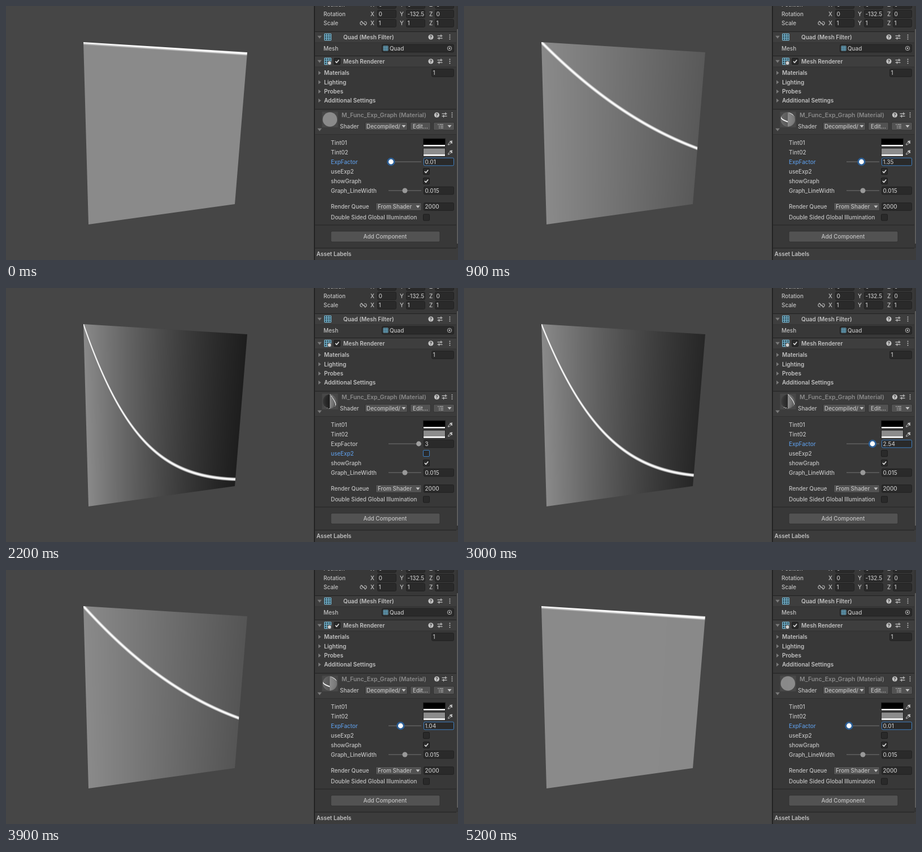
Recreate the animation shown at these times as an HTML page with a canvas. Size 800 by 450 pixels, loop 5500 ms.

```html
<!DOCTYPE html>
<html lang="en">
<head>
<meta charset="utf-8">
<title>Exponential graph material</title>
<style>
html, body { margin: 0; width: 100%; height: 100%; overflow: hidden; background: #464646; }
svg, canvas { position: absolute; left: 0; top: 0; width: 100%; height: 100%; display: block; }
text { font: 500 9.9px Inter, Roboto, sans-serif; fill: #c2c2c2; white-space: pre; }
text.bold { font-weight: 600; font-size: 10px; }
text.title { font-weight: 600; font-size: 10.4px; fill: #8b8b8b; }
text.mid { text-anchor: middle; }
.focus text { fill: #5c97dc; }
.on { stroke: #3f7fc1 !important; }
</style>
</head>
<body>
<svg id="ui" viewBox="0 0 800 450"></svg>
<canvas id="view" width="800" height="450"></canvas>
<script>
const LOOP = 5500, STEP = 100, LINE_WIDTH = 0.015;
const ui = document.getElementById('ui');
const view = document.getElementById('view').getContext('2d');

// ---------- inspector panel ----------
const rect = (x, y, w, h, fill, more = '') =>
  `<rect x="${x}" y="${y}" width="${w}" height="${h}" fill="${fill}" ${more}/>`;
const text = (x, y, s, cls = '', more = '') =>
  `<text x="${x}" y="${y + 3.6}" class="${cls}" ${more}>${s}</text>`;
const path = (d, stroke = '#c4c4c4', width = 1, fill = 'none') =>
  `<path d="${d}" stroke="${stroke}" stroke-width="${width}" fill="${fill}"/>`;
const circle = (x, y, r, fill, more = '') =>
  `<circle cx="${x}" cy="${y}" r="${r}" fill="${fill}" ${more}/>`;
const line = (y, color = '#202020') => rect(547, y, 250, 1, color);

const field = (x, y, w, s, id = '') =>
  rect(x + .5, y - 6.8, w - 1, 13.6, '#2a2a2a', `rx="2" stroke="#212121" ${id && `id="${id}Box"`}`) +
  text(x + 2.5, y, s, '', id && `id="${id}Text"`);
const button = (x, y, w, h = 14) =>
  rect(x + .5, y - h / 2, w - 1, h, '#525252', 'rx="2" stroke="#303030"');
const arrowDown = (x, y, r = 3.5, fill = '#c4c4c4') =>
  path(`M${x - r} ${y - r * .6}h${2 * r}l${-r} ${r * 1.3}z`, 'none', 0, fill);
const arrowRight = (x, y) => path(`M${x - 2} ${y - 3.5}v7l4.5 -3.5z`, 'none', 0, '#7a7a7a');
const tick = (x, y) => `M${x - 3} ${y}l2.2 2.4l4 -4.8`;
const checkbox = (x, y, on, id = '') =>
  rect(x - 5.5, y - 5.5, 11, 11, '#2a2a2a', `rx="1.5" stroke="#1c1c1c" ${id && `id="${id}Box"`}`) +
  `<g ${id && `id="${id}Tick"`}>${on ? path(tick(x, y), '#e6e6e6', 1.6) : ''}</g>`;
const grid = (x, y, s) => {
  let d = '';
  for (let i = 0; i < 4; i++) {
    const o = (i / 3 - .5) * s;
    d += `M${x + o} ${y - s / 2}v${s}M${x - s / 2} ${y + o}h${s}`;
  }
  return rect(x - s / 2, y - s / 2, s, s, '#2b4650') + path(d, '#86cdec', s / 11);
};
const headerIcons = (a, b, c, y) =>
  circle(a, y, 4.6, '#c4c4c4') +
  `<text x="${a}" y="${y + 2.9}" class="mid" style="font-size:8px;font-weight:700;fill:#3c3c3c">?</text>` +
  path(`M${b - 5} ${y - 2.2}h9M${b - 5} ${y + 2.2}h9M${b + 1.5} ${y - 4.4}v4.4M${b - 2} ${y}v4.4`, '#c4c4c4', 1.2) +
  [-3.6, 0, 3.6].map(o => circle(c, y + o, 1, '#c4c4c4')).join('');
const slider = (y, knob) =>
  rect(677, y - .8, 58, 1.6, '#5e5e5e') + knob;
const swatch = (y, color) =>
  rect(738.5, y - 7, 39, 14, color, 'stroke="#212121"') + rect(739, y + 4, 38, 2.6, '#fff') +
  path(`M782.5 ${y + 4}l.6 -2.2l4 -4l1.8 1.8l-4 4z`, '#c4c4c4', 1) +
  path(`M785.8 ${y - 2.8}l4 4M787.5 ${y - 1}l2.2 -2.2`, '#c4c4c4', 2);
const axes = (y, values) => ['X', 'Y', 'Z'].map((name, i) => {
  const x = [645, 697, 749][i];
  return text(x, y, name) + `<svg x="${[657, 708, 759][i]}" y="${y - 8}" width="34" height="16">` +
    field(0, 8, 34, values[i]) + '</svg>';
}).join('');

ui.innerHTML =
  rect(0, 0, 800, 450, '#464646') + rect(545, 0, 255, 450, '#383838') + rect(545, 0, 1.6, 450, '#1d1d1d') +
  // transform
  text(562, -2.5, 'Position') + axes(-2.5, ['0', '0', '0']) +
  text(562, 14, 'Rotation') + axes(14, ['0', '-132.5', '0']) +
  text(562, 30.5, 'Scale') + axes(30.5, ['1', '1', '1']) +
  path('M631 27.8h-1.4a2.7 2.7 0 0 0 0 5.4h1.4M634 27.8h1.4a2.7 2.7 0 0 1 0 5.4h-1.4M630 30.5h5M628.5 26.5l8 8', '#b4b4b4', 1.1) +
  // mesh filter
  rect(547, 45, 250, 20, '#3e3e3e') + line(45) + line(64.5, '#303030') +
  arrowDown(555, 55, 3.8, '#7a7a7a') + grid(569.5, 55, 11.5) + text(597, 55, 'Quad (Mesh Filter)', 'bold') +
  headerIcons(752, 768.5, 785.5, 55) +
  text(562, 75, 'Mesh') + field(665, 75, 128, '') + grid(672, 75, 8) + text(679, 75, 'Quad') +
  circle(785, 75, 3.7, 'none', 'stroke="#b8b8b8"') + circle(785, 75, 1.4, '#b8b8b8') +
  // mesh renderer
  rect(547, 88, 250, 20, '#3e3e3e') + line(88) + line(107.5, '#303030') +
  arrowDown(555, 98, 3.8, '#7a7a7a') + grid(569.5, 98, 11.5) + circle(572.5, 101, 3.6, '#d0d0d0', 'stroke="#3e3e3e"') +
  checkbox(586, 98, true) + text(597, 98, 'Mesh Renderer', 'bold') + headerIcons(752, 768.5, 785.5, 98) +
  [['Materials', 118.5], ['Lighting', 135], ['Probes', 151.5], ['Additional Settings', 167.5]]
    .map(([s, y]) => arrowRight(555, y) + text(563, y, s, 'bold')).join('') +
  field(753, 118.5, 40, '1') +
  // material header
  rect(547, 183, 250, 44, '#3c3c3c') + line(182.5) + line(227, '#303030') +
  rect(559.5, 187, 28, 28, '#484848') + arrowDown(555, 219, 3.8, '#7a7a7a') +
  text(594, 193, 'M_Func_Exp_Graph (Material)', 'title') + headerIcons(762.5, 776.5, 789.5, 193) +
  text(591, 213, 'Shader') + button(635, 213, 76) +
  `<svg x="638" y="205" width="61" height="16">${text(0, 8, 'Decompiled/')}</svg>` + arrowDown(704, 213) +
  button(715, 213, 37) + text(733.5, 213, 'Edit...', 'mid') + button(756, 213, 38) +
  path('M764 210h2M767 210h7M766 213h2M769 213h5M766 216h2M769 216h5', '#c4c4c4', 1.1) + arrowDown(785, 213) +
  // material properties
  text(575, 242, 'Tint01') + swatch(242, '#000') +
  text(575, 259, 'Tint02') + swatch(259, '#8c8c8c') +
  `<g id="factorLabel">${text(575, 276, 'ExpFactor')}</g>` +
  slider(276, circle(0, 276, 7.2, '#2c5f96', 'id="halo"') + circle(0, 276, 4.4, '#fff', 'id="knob"')) +
  field(739, 276, 54, '', 'factor') +
  `<g id="exp2Label">${text(575, 293, 'useExp2')}</g>` + checkbox(744, 293, true, 'exp2') +
  text(575, 310, 'showGraph') + checkbox(744, 310, true) +
  text(575, 327, 'Graph_LineWidth') + slider(327, circle(706, 327, 4.5, '#999')) + field(739, 327, 54, '0.015') +
  text(575, 355.5, 'Render Queue') + button(654, 355.5, 82) + text(658, 355.5, 'From Shader') + arrowDown(729, 355.5) +
  field(739, 355.5, 54, '2000') +
  text(575, 374.5, 'Double Sided Global Illumination') + checkbox(744, 374.5, false) +
  line(387.5, '#242424') + button(574.5, 408.5, 194, 19) + text(671, 408.5, 'Add Component', 'mid') +
  rect(547, 429, 253, 21, '#3c3c3c') + line(428.5) + text(549.5, 439.5, 'Asset Labels', 'bold') +
  rect(797, 0, 3, 429, '#343434') + rect(798, 41, 2, 380, '#5c5c5c');

// ---------- shader ----------
const TINT = 0.254; // linear value of the grey tint
const clamp01 = v => Math.min(1, Math.max(0, v));
const smooth = v => (v = clamp01(v), v * v * (3 - 2 * v));
const encode = c => 255 * (c <= .0031308 ? 12.92 * c : 1.055 * c ** (1 / 2.4) - .055);

function shade(u, v, state, width) {
  const curve = Math.exp(-state.factor * u * (state.exp2 ? Math.LN2 : 1));
  const graph = smooth(1 - Math.abs(v - curve) / width);
  return encode(TINT * curve * (1 - graph) + graph);
}

// Perspective mapping of the unit square, v counted from the top edge.
const corners = [[137, 64], [427, 82], [405, 351], [146, 387]];
const [[x0, y0], [x1, y1], [x2, y2], [x3, y3]] = corners;
const sx = x0 - x1 + x2 - x3, sy = y0 - y1 + y2 - y3;
const det = (x1 - x2) * (y3 - y2) - (x3 - x2) * (y1 - y2);
const g = (sx * (y3 - y2) - (x3 - x2) * sy) / det;
const h = ((x1 - x2) * sy - sx * (y1 - y2)) / det;
const ax = x1 - x0 + g * x1, bx = x3 - x0 + h * x3;
const ay = y1 - y0 + g * y1, by = y3 - y0 + h * y3;

function quadUV(x, y) {
  const a = ax - x * g, b = bx - x * h, c = ay - y * g, d = by - y * h;
  const p = x - x0, q = y - y0, k = a * d - b * c;
  return [clamp01((p * d - b * q) / k), clamp01(1 - (a * q - p * c) / k)];
}

const BALL = { x: 573.3, y: 201, r: 12.8 };
function ballUV(x, y) {
  const nx = (x - BALL.x) / BALL.r, ny = Math.max(-1, Math.min(1, (BALL.y - y) / BALL.r));
  const u = Math.atan2(nx, Math.sqrt(Math.max(0, 1 - nx * nx - ny * ny))) / Math.PI;
  return [u < 0 ? u + 1 : u, .5 + Math.asin(ny) / Math.PI];
}

function surface(x, y, w, h, toUV, width, outline) {
  const canvas = document.createElement('canvas');
  canvas.width = w;
  canvas.height = h;
  const ctx = canvas.getContext('2d'), image = ctx.createImageData(w, h);
  const uv = Array.from({ length: w * h }, (_, i) => toUV(x + i % w + .5, y + Math.floor(i / w) + .5));
  return state => {
    uv.forEach(([u, v], i) => {
      const c = shade(u, v, state, width);
      image.data.set([c, c, c, 255], i * 4);
    });
    ctx.putImageData(image, 0, 0);
    view.save();
    view.beginPath();
    outline();
    view.clip();
    view.drawImage(canvas, x, y);
    view.restore();
  };
}

const drawQuad = surface(136, 63, 292, 326, quadUV, LINE_WIDTH, () => {
  corners.forEach(([x, y]) => view.lineTo(x, y));
  view.closePath();
});
const drawBall = surface(559, 187, 29, 28, ballUV, .045, () => view.arc(BALL.x, BALL.y, BALL.r, 0, 7));

// ---------- timeline ----------
const factorKeys = [[0, .01], [300, .2], [600, .65], [900, 1.35], [1300, 3], [2700, 3],
  [3500, 1.76], [4300, .32], [4700, .12], [5100, .01], [LOOP, .01]];

function factorAt(t) {
  const i = factorKeys.findIndex(([time]) => time > t);
  const [ta, a] = factorKeys[i - 1], [tb, b] = factorKeys[i];
  return a + (b - a) * (t - ta) / (tb - ta);
}

const $ = id => document.getElementById(id);
function render(t) {
  const state = { factor: +factorAt(t).toFixed(2), exp2: t < 2000 };
  const onToggle = t >= 2000 && t < 2800, onFactor = !onToggle;
  const knobX = 681.3 + 16.4 * state.factor;

  $('factorLabel').classList.toggle('focus', onFactor);
  $('factorBox').classList.toggle('on', onFactor);
  $('factorText').textContent = state.factor;
  $('halo').setAttribute('cx', knobX);
  $('halo').style.display = onFactor ? '' : 'none';
  $('knob').setAttribute('cx', knobX);
  $('knob').setAttribute('fill', onFactor ? '#fff' : t >= 2500 ? '#e6e6e6' : '#a0a0a0');

  $('exp2Label').classList.toggle('focus', onToggle);
  $('exp2Box').classList.toggle('on', onToggle);
  $('exp2Box').style.stroke = t >= 1800 && t < 2000 ? '#6a6a6a' : '';
  $('exp2Tick').style.display = state.exp2 ? '' : 'none';

  view.clearRect(0, 0, 800, 450);
  drawQuad(state);
  drawBall(state);
}

let shown = -1;
const start = performance.now();
function tickFrame() {
  const t = Math.floor((performance.now() - start) % LOOP / STEP) * STEP;
  if (t !== shown) render(shown = t);
  requestAnimationFrame(tickFrame);
}
tickFrame();
</script>
</body>
</html>
```
